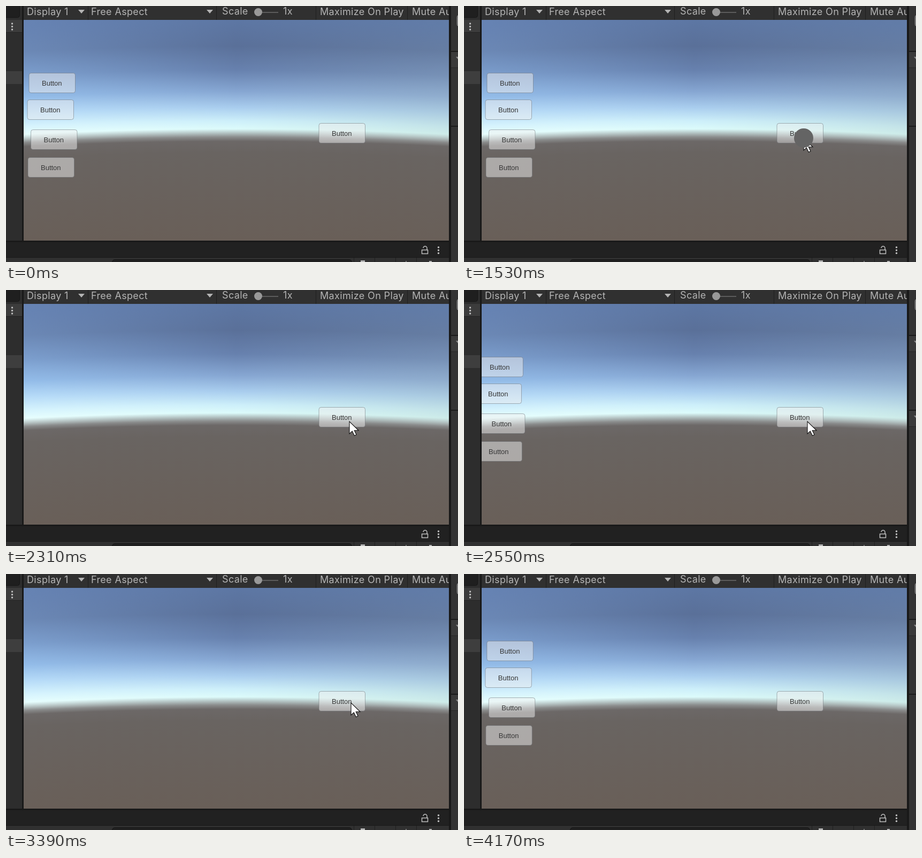
Recreate the animation shown at these times as an HTML page with a canvas. Size 845 by 479 pixels, loop 4.62 s.

```html
<!DOCTYPE html>
<html lang="en">
<head>
<meta charset="utf-8">
<title>Sliding menu</title>
<style>
  html, body { margin: 0; width: 100%; height: 100%; overflow: hidden; background: #191919; }
  canvas { display: block; }
</style>
</head>
<body>
<canvas id="stage" width="845" height="479"></canvas>
<script>
const LOOP = 4620, STEP = 77;
const VIEW = { x: 33, y: 26, w: 795, h: 413 };
const stage = document.getElementById('stage');
const backdrop = document.createElement('canvas');
backdrop.width = stage.width;
backdrop.height = stage.height;
let ctx = backdrop.getContext('2d');

function rect(color, x, y, w, h) {
  ctx.fillStyle = color;
  ctx.fillRect(x, y, w, h);
}

function roundRect(x, y, w, h, r, fill, stroke) {
  ctx.beginPath();
  ctx.roundRect(x, y, w, h, r);
  ctx.fillStyle = fill;
  ctx.fill();
  ctx.strokeStyle = stroke;
  ctx.lineWidth = 1;
  ctx.stroke();
}

function disc(color, x, y, r) {
  ctx.beginPath();
  ctx.arc(x, y, r, 0, 7);
  ctx.fillStyle = color;
  ctx.fill();
}

function text(label, x, y, font, color) {
  ctx.font = font;
  ctx.fillStyle = color;
  ctx.fillText(label, x, y);
}

function clipTo(x, y, w, h, paint) {
  ctx.save();
  ctx.beginPath();
  ctx.rect(x, y, w, h);
  ctx.clip();
  paint();
  ctx.restore();
}

function arrowDown(x, y, color = '#b4b4b4') {
  ctx.fillStyle = color;
  ctx.fill(new Path2D(`M${x - 6} ${y - 3}h12l-6 7z`));
}

const kebab = (x, y) => [-5.5, 0, 5.5].forEach(dy => disc('#c0c0c0', x, y + dy, 1.7));

function vertical(stops) {
  const g = ctx.createLinearGradient(0, VIEW.y, 0, VIEW.y + VIEW.h);
  for (const [y, color] of stops) g.addColorStop((y - VIEW.y) / VIEW.h, color);
  return g;
}

// Each column repeats one gradient, dropped along the curved horizon and tinted towards the sides
function drawSky() {
  const base = vertical([
    [26, '#5d77a4'], [75, '#5a7099'], [120, '#6781ae'], [160, '#86a6d2'], [190, '#a9cdee'],
    [215, '#cdeffa'], [230, '#dcfbfb'], [245, '#8b8d8d'], [253, '#6c6867'], [275, '#696461'], [439, '#695f58']
  ]);
  const tint = (top, middle, low) => vertical([[26, top], [160, middle], [230, low], [246, 'rgba(180,180,180,0)']]);
  const left = tint('rgba(140,180,240,.2)', 'rgba(160,210,255,.5)', 'rgba(235,255,255,.7)');
  const right = tint('rgba(140,170,200,.1)', 'rgba(160,185,200,.4)', 'rgba(190,220,215,.5)');
  clipTo(VIEW.x, VIEW.y, VIEW.w, VIEW.h, () => {
    for (let x = VIEW.x; x < VIEW.x + VIEW.w; x++) {
      const u = (x - 430) / 398, drop = 10 * u * u;
      ctx.setTransform(1, 0, 0, 1, 0, drop);
      rect(base, x, VIEW.y - drop, 1, VIEW.h);
      ctx.globalAlpha = Math.min(1, Math.abs(u));
      rect(u < 0 ? left : right, x, VIEW.y - drop, 1, VIEW.h);
      ctx.globalAlpha = 1;
    }
  });
}

function drawLeftPanel() {
  rect('#2d2d2d', 0, 0, 30, 439);
  roundRect(-10, -10, 35.5, 31.5, 4, '#1f1f1f', '#161616');
  rect('#3c3c3c', 0, 26, 30, 24);
  rect('#222', 0, 49, 30, 1);
  rect('#3e3e3e', 0, 122, 30, 24);
  kebab(11.5, 38.5);
}

function drawToolbar() {
  rect('#303030', 33, 0, 795, 26);
  for (const x of [153, 393, 579, 750]) rect('#1f1f1f', x, 0, 1, 26);
  clipTo(33, 0, 795, 26, () => {
    const label = (s, x, y = 17) => text(s, x, y, '18px Inter, sans-serif', '#b4b4b4');
    ctx.letterSpacing = '0.35px';
    label('Display 1', 39);
    label('Free Aspect', 159);
    label('Scale', 404, 16);
    label('1x', 518, 16);
    label('Maximize On Play', 587);
    label('Mute Audio', 759);
  });
  arrowDown(141, 10);
  arrowDown(381, 10);
  rect('#5c5c5c', 471, 11, 38, 2);
  disc('#999', 471.5, 11.5, 7.5);
}

function drawBottomPanel() {
  rect('#212121', 0, 442, 828, 28);
  rect('#303030', 0, 471, 828, 8);
  roundRect(198.5, 474.5, 448, 20, 5, '#202020', '#141414');
  for (const x of [650, 689, 728, 767]) rect('#1f1f1f', x, 471, 1, 8);
  rect('#b4b4b4', 663, 476, 8, 3);
  rect('#777', 747, 477, 2, 2);
  rect('#b4b4b4', 791, 477, 5, 2);
  kebab(808.5, 457);
  ctx.strokeStyle = '#c0c0c0';
  ctx.lineWidth = 1.5;
  ctx.stroke(new Path2D('M777.5 456.5h11v7h-11zM787 456v-3a3.5 3.5 0 0 0-7 0'));
}

function drawRightPanel() {
  rect('#333', 832, 0, 13, 479);
  rect('#1a1a1a', 832, 84, 13, 2);
  rect('#1a1a1a', 832, 224, 13, 2);
  roundRect(843.5, 17.5, 10, 20, 3, '#555', '#b0b0b0');
  foldoutHeader(86);
}

function foldoutHeader(y) {
  rect('#3a3a3a', 832, y, 13, 29);
  rect('#262626', 832, y + 29, 13, 1);
  arrowDown(847, y + 12, '#8c8c8c');
}

rect('#191919', 0, 0, 845, 479);
drawSky();
drawLeftPanel();
drawToolbar();
drawBottomPanel();
drawRightPanel();
ctx = stage.getContext('2d');

function button(x, y, pressed) {
  roundRect(x + .5, y + .5, 86.5, 37, 4, `rgba(240,240,240,${pressed ? .4 : .5})`, 'rgba(100,105,110,.5)');
  text('Button', x + 24.5, y + 23.5, '13px "Liberation Sans", Arial, sans-serif', '#363636');
}

// The menu closes on clicks 0 and 2 and opens on clicks 1 and 3 (times in steps)
const CLICKS = [20, 30.5, 40, 45.8];
const SLIDE = 140, DECAY = .45;

function menuOffset(step) {
  const last = CLICKS.filter(c => c <= step).length - 1;
  if (last < 0) return 0;
  const left = SLIDE * DECAY ** (step - CLICKS[last]);
  return last % 2 ? -left : left - SLIDE;
}

// Mouse positions: [step, x, y]
const PATH = [
  [7, 197, 465], [10, 650, 366], [11, 641, 292], [13, 636, 254], [18, 635, 247], [20, 635, 247],
  [22, 641, 247], [37, 642, 245], [43, 643, 244], [44, 645, 241], [49, 645, 241], [51, 665, 313]
];
const ARROW = new Path2D('M0 0V23L5.3 18.2 9.3 26.5 13 24.8 9.2 16.8H17z');

function cursorAt(step) {
  const i = PATH.findIndex(p => p[0] > step);
  if (i < 1) return null;
  const [t0, x0, y0] = PATH[i - 1], [t1, x1, y1] = PATH[i], u = (step - t0) / (t1 - t0);
  return [Math.round(x0 + (x1 - x0) * u), Math.round(y0 + (y1 - y0) * u)];
}

function drawCursor([x, y], pressed) {
  ctx.save();
  ctx.translate(x, y);
  ctx.fillStyle = '#fff';
  ctx.fill(ARROW);
  ctx.strokeStyle = '#111';
  ctx.lineWidth = 1.1;
  ctx.stroke(ARROW);
  if (pressed) disc('#646464', 0, 0, 18);
  ctx.restore();
}

function draw(step) {
  const pressed = CLICKS.some(c => step >= c && step < c + 2);
  ctx.drawImage(backdrop, 0, 0);
  if (step >= 33 && step < 54) foldoutHeader(226);
  clipTo(VIEW.x, VIEW.y, VIEW.w, VIEW.h, () => {
    const dx = menuOffset(step);
    button(42.5 + dx, 125);
    button(39.5 + dx, 175);
    button(46 + dx, 231);
    button(40.5 + dx, 283);
    button(584.5, 219, pressed);
  });
  const tip = cursorAt(step);
  if (tip) drawCursor(tip, pressed);
}

function tick() {
  const t = performance.now() % LOOP;
  draw(Math.floor((t + 15) / STEP) % (LOOP / STEP));
  requestAnimationFrame(tick);
}
tick();
</script>
</body>
</html>
```
